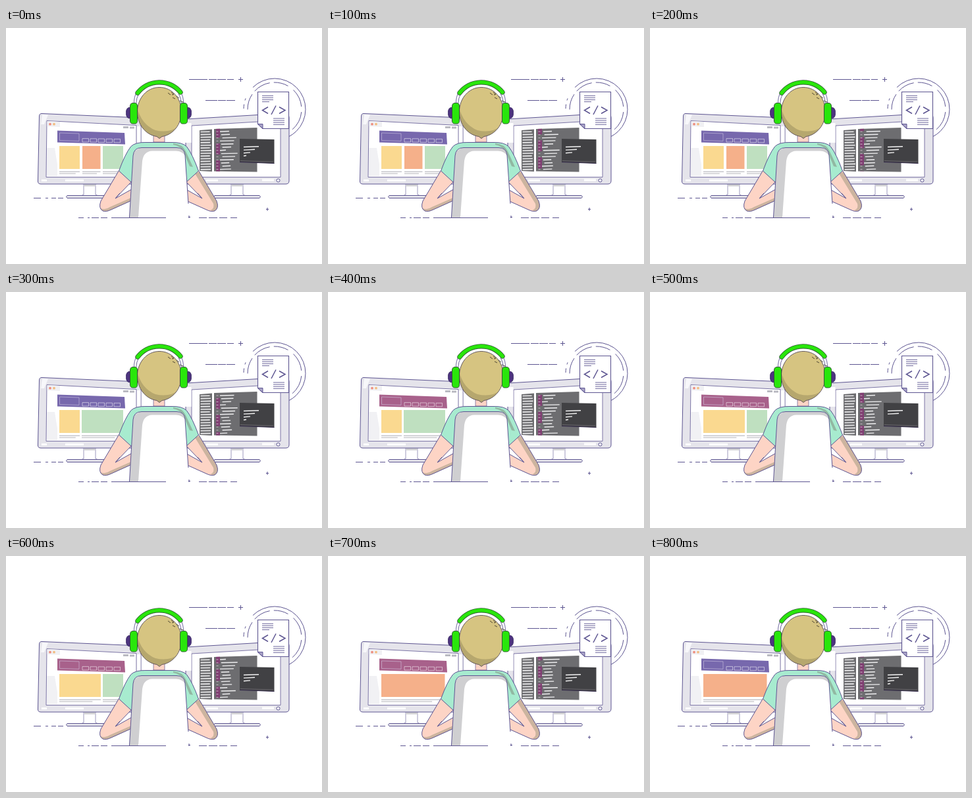
These frames come from a looping animation (480 px wide and 360 px high, 900 ms). An HTML page with a canvas:

```html
<!DOCTYPE html>
<html lang="en">
<head>
<meta charset="utf-8">
<title>Developer at work</title>
<style>
html, body { margin: 0; width: 100%; height: 100%; overflow: hidden; background: #fff; }
canvas { display: block; width: 480px; height: 360px; }
</style>
</head>
<body>
<canvas id="stage"></canvas>
<script>
const canvas = document.getElementById('stage');
const ratio = window.devicePixelRatio || 1;
canvas.width = 480 * ratio;
canvas.height = 360 * ratio;
const c = canvas.getContext('2d');
c.scale(ratio, ratio);

const LOOP = 900, STEP = 100;
const INK = '#5d5591', GREY = '#e5e4eb', SHADE = '#cfcfd1', SKIN = '#fdd4c5', TAN = '#ccb49f';
const MINT = '#a7ebcf', GREEN = '#29e60b', HAIR = '#d6c481', HAIR_DARK = '#b6a76e';
const YELLOW = '#fad990', ORANGE = '#f5b08a', LIME = '#bfe0c0';

function shape(d, fill, stroke, width = 1) {
  const p = new Path2D(d);
  if (fill) { c.fillStyle = fill; c.fill(p); }
  if (stroke) { c.strokeStyle = stroke; c.lineWidth = width; c.stroke(p); }
}

function line(x1, y1, x2, y2, color = INK, width = 1) {
  shape(`M${x1} ${y1}L${x2} ${y2}`, null, color, width);
}

function box(x, y, w, h, fill) {
  c.fillStyle = fill;
  c.fillRect(x, y, w, h);
}

function arc(x, y, r, from, to) {
  c.beginPath();
  c.arc(x, y, r, from, to);
  c.strokeStyle = INK;
  c.lineWidth = 1;
  c.stroke();
}

function inside(d, paint) {
  c.save();
  c.clip(new Path2D(d));
  paint();
  c.restore();
}

function mirrored(paint) {
  c.save();
  c.translate(464, 0);
  c.scale(-1, 1);
  paint();
  c.restore();
}

function dashes(y, spans) {
  for (const [from, to] of spans) line(from, y, to, y);
}

function backdrop() {
  dashes(78.5, [[278, 306], [308, 320], [321, 334], [336, 346], [353, 360]]);
  line(356.5, 75, 356.5, 82);
  dashes(110.5, [[303, 321], [322, 334], [335, 348]]);
  dashes(259.5, [[42, 53], [60, 64], [69, 76], [79, 87]]);
  dashes(289.5, [[110, 118], [124, 127], [130, 141], [144, 154], [160, 187],
    [293, 305], [308, 321], [324, 336], [341, 351]]);
  dashes(276.5, [[395, 399]]);
  line(397, 274, 397, 279);
  line(276, 288.5, 280, 288.5);
  line(278, 286, 278, 290);
  arc(408, 124, 47, -2.35, 1.1);
  arc(408, 124, 47, -3.12, -2.98);
  arc(408, 124, 47, -2.85, -2.78);
  for (const [from, to] of [[-3.15, -2.55], [-2.4, -1.75], [-1.6, -1.05], [-0.8, -0.1], [0.1, 0.85]]) {
    arc(408, 124, 41, from, to);
  }
}

function stand(x) {
  shape(`M${x - 9} 238V254L${x - 13} 256M${x + 9} 238V254L${x + 13} 256`, null, INK, 0.6);
  box(x - 8.5, 238, 17, 3.5, SHADE);
  shape(`M${x - 34} 255.5H${x + 34}Q${x + 37} 257.5 ${x + 34} 259.5H${x - 34}Q${x - 37} 257.5 ${x - 34} 255.5Z`, GREY, INK);
}

function layoutAt(f) {
  if (f < 3) return [[81, 112, YELLOW], [116, 143.5, ORANGE], [147, 178, LIME]];
  if (f < 5) return [[81, 112, YELLOW], [115, 178, LIME]];
  if (f < 7) return [[81, 144, YELLOW], [147, 178, LIME]];
  return [[81, 177.5, ORANGE]];
}

function browser(f) {
  const head = f >= 4 && f <= 7 ? '#a8618b' : '#7768ad';
  shape('M62 141.5L198 148.5V227.5H61Z', '#fff', INK, 0.8);
  shape('M62.5 142L82 143V151L62.5 150Z', '#f0f0f3');
  shape('M62.5 183H74L78 208V226H62Z', '#f1f1f4');
  [[67, '#ee8f80'], [73, '#f2bd83']].forEach(([x, color]) => {
    c.beginPath();
    c.arc(x, 146.7, 1.9, 0, 7);
    c.fillStyle = color;
    c.fill();
  });
  box(178, 150, 8, 3, '#b9b9c1');
  box(188, 150.5, 7, 3, '#b9b9c1');

  shape('M78 156.5L180 160L181 177.5L78 174.5Z', head);
  c.globalAlpha = 0.65;
  shape('M81.5 160L111 161V172.5L81.5 171.5Z', null, '#d9d0e9', 0.8);
  for (let i = 0; i < 5; i++) {
    shape(`M${116 + i * 12} ${168.6 + i * 0.2}h9.5v5.4h-9.5Z`, null, '#fff', 0.8);
  }
  c.globalAlpha = 1;

  for (const [from, to, color] of layoutAt(f)) {
    box(from, 180, to - from, 35, color);
    box(from, 218.5, to - from, 1.4, '#c3c3c9');
    box(from, 221.4, (to - from) * 0.8, 1.3, '#c3c3c9');
  }
}

function leftMonitor(f) {
  stand(127);
  shape('M54 130.5L205 137V238H53Q48 238 48.5 233L50.5 135Q50.5 130.5 54 130.5Z', GREY, INK);
  shape('M55 132L64 132.5L58 147H53Z', '#f7f7fa');
  line(54, 232.5, 62, 232.5, '#fff', 3);
  line(90, 232.5, 118, 232.5, '#fff', 3);
  box(198.5, 150, 6, 30, '#fff');
  browser(f);
}

const noise = n => {
  const v = Math.sin(n * 12.9898 + 4.1) * 43758.5453;
  return v - Math.floor(v);
};

function editor(f) {
  const code = 'M316 154L381.5 152V219.5L316 218.5Z';
  shape('M294 156L313 154.5V219L294 218Z', '#6d6d70');
  shape(code, '#6d6d70');
  for (let i = 0; i < 15; i++) {
    const y = 158.5 + i * 4.1;
    line(295.5, y, 309.5 + noise(i + 70) * 2.5, y - 0.3, '#ededee', 1.6);
  }
  inside(code, () => {
    const shift = f * 4.8;
    for (let i = 0; i < 4; i++) {
      box(319, 159 + i * 26 - (shift + 9) % 26, 6, 17, '#803e72');
    }
    for (let i = 0; i < 13; i++) {
      const n = i + f;
      const y = 158 + i * 4.8;
      const x = 325 + (n % 3) * 1.8;
      line(319.5, y, 322.5, y, '#c7b5c4', 1);
      line(x, y, x + 7 + noise(n) * 18, y - 0.5, '#efeff0', 1.4);
    }
  });
}

function terminal(f) {
  const counts = [4, 3, 3, 4, 4, 2, 3, 3, 4];
  const widths = [23, 17, 10, 4];
  shape('M355 169L407.5 170V206.5L355 204.5Z', '#414144');
  line(355, 204.5, 407.5, 206.5, '#352b4c', 1);
  line(356, 202.5, 406, 204, '#77737c', 0.7);
  for (let i = 0; i < counts[f]; i++) {
    const y = 181.5 + i * 4.6;
    line(361, y, 361 + widths[i], y - 0.8, '#f3f3f3', 1.4);
  }
}

function rightMonitor(f) {
  stand(351);
  shape('M273 139L383 132.5L426 132Q430 132 430 137V233Q430 238 425 238H273Z', GREY, INK);
  shape('M282 149L417 141V227.5H282Z', '#fff', INK, 0.8);
  box(272, 145, 9.5, 30, '#fff');
  line(304, 232.5, 322, 232.5, '#fff', 3);
  line(389, 232, 407, 232, '#fff', 3);
  c.beginPath();
  c.arc(413.5, 232.5, 2.5, 0, 7);
  c.fillStyle = '#fff';
  c.fill();
  c.strokeStyle = INK;
  c.lineWidth = 1;
  c.stroke();
  editor(f);
  terminal(f);
}

function documentIcon() {
  shape('M382.5 97.5H429.5V153.5H390L382.5 146.5Z', '#fff', INK, 1.1);
  shape('M382.5 146.5H390V153.5Z', '#aaa4c8', INK);
  for (let i = 0; i < 4; i++) {
    line(389, 103.5 + i * 3, i === 3 ? 400 : 406, 103.5 + i * 3, INK, 0.9);
    line(406, 138 + i * 3.1, 423, 138 + i * 3.1, INK, 0.9);
  }
  shape('M398 120.5L389.5 125.5L398 130.5M415 120.5L424 125.5L415 130.5M410 118.5L403 132', null, INK, 1.5);
}

function arm(shadow) {
  const d = 'M171.5 217.5L144 264Q140 275 147 279Q152 281 160 277L191 263V246L166 260L191 234Z';
  shape(d, SKIN);
  inside(d, () => shape(shadow, TAN));
  shape(d, null, INK);
  line(166, 260, 173, 252);
}

function sleeve() {
  shape('M213 174.5Q196 174 189.5 181Q181 192 171.5 218L190 235L233 220V174.5Z', MINT, INK);
}

function body() {
  arm('M140 272Q148 280 158 273L192 258V268L150 284L138 279Z');
  mirrored(() => arm('M166 218L177 222L149 268Q147 276 154 278L140 282L138 266Z'));
  sleeve();
  mirrored(sleeve);
  box(210, 175, 44, 40, MINT);
  shape('M254 176Q268 177 273 188L284 212L279 211L269 187Q264 180 254 178Z', '#91b8a2');
  shape('M224 161H241V174H224Z', SKIN, INK, 0.7);
  line(212, 174.5, 252, 174.5);
}

function chair() {
  const d = 'M187.5 289L193 195Q194 182.5 206 182.5H259Q271 182.5 272 194L277 266V289Z';
  shape(d, '#fff');
  inside(d, () => shape('M187 289L192 190L204 182H262Q270 183 273 196Q268 187.5 258 187.5H222Q209 188 207 203L201 289Z', SHADE));
  shape('M187.5 289L193 195Q194 182.5 206 182.5H259Q271 182.5 272 194L277 268', null, INK);
  line(187, 289.5, 243, 289.5);
}

function head() {
  const d = 'M233 90.5C252 90.5 266.5 107 266.5 128C266.5 147 254 163 237 165.5L233 168.5L229 165.5C212 163 199.5 147 199.5 128C199.5 107 214 90.5 233 90.5Z';
  shape(d, HAIR);
  inside(d, () => shape('M198 115Q203 146 227 156Q248 161 262 150L259 167L233 176L196 158Z', HAIR_DARK));
  shape(d, null, '#665b62');
  shape('M246 99L250 102M251 98L255 101L252 102M253 106L257 108M259 104L263 107M264 111L269 113', null, '#514833');
}

function cup() {
  shape('M189 121Q182 121 182.5 129.5Q182 138 189 138Z', '#4d347f', '#33245d', 0.8);
  shape('M199 97Q194 105 194.5 116M202 100Q198 106 197.5 116', null, INK, 0.9);
  shape('M192 114.5H196.5Q199.5 115 199.5 119V141Q199.5 146 196 146H192.5Q188.5 146 188.5 141V119Q188.5 115 192 114.5Z', GREEN, '#315b36');
}

function headphones() {
  cup();
  mirrored(cup);
  c.lineCap = 'round';
  const band = 'M200 99A41.5 41.5 0 0 1 265 98';
  shape(band, null, '#315b36', 7.3);
  shape(band, null, GREEN, 5.6);
  c.lineCap = 'butt';
}

function draw(now) {
  const f = Math.floor((now % LOOP) / STEP);
  box(0, 0, 480, 360, '#fff');
  backdrop();
  leftMonitor(f);
  rightMonitor(f);
  documentIcon();
  body();
  chair();
  head();
  headphones();
}

const start = performance.now();
function tick() {
  draw(performance.now() - start);
  requestAnimationFrame(tick);
}
tick();
</script>
</body>
</html>
```
